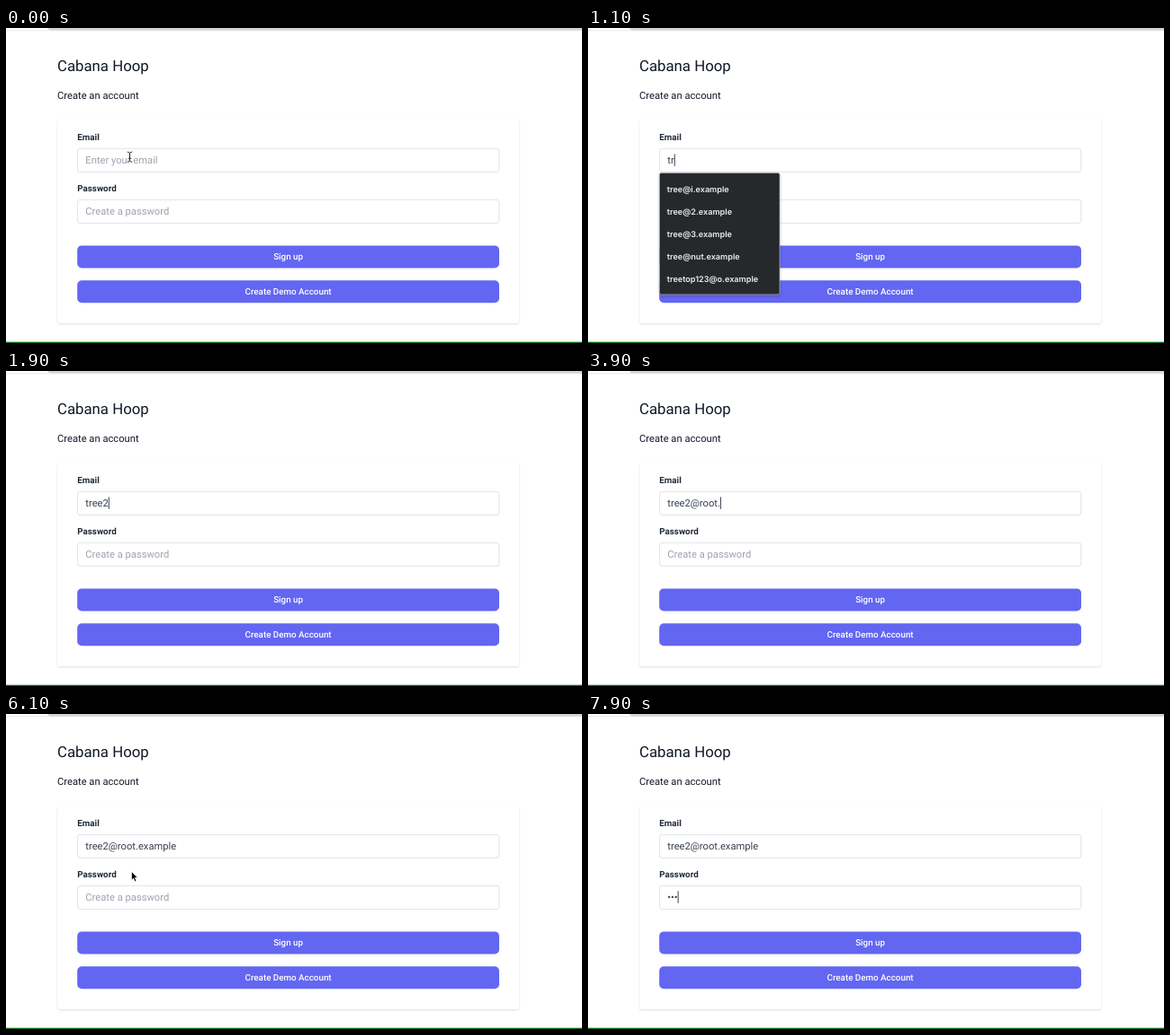
These frames come from a looping animation (640x351 px, 8000 ms). An HTML page:

```html
<!DOCTYPE html>
<html lang="en">
<head>
<meta charset="utf-8">
<title>Create an account</title>
<style>
  html, body { margin: 0; width: 100%; height: 100%; overflow: hidden; background: #fff; }
  svg { display: block; width: 640px; height: 351px; }
  text { font: 11.2px Roboto, sans-serif; fill: #111827; text-rendering: geometricPrecision; white-space: pre; }
  .title { font-size: 16.8px; }
  .label { font-size: 9.8px; font-weight: 700; fill: #1f2937; }
  .hint { fill: #9ca3af; }
  .typed { fill: #374151; }
  .btn { fill: #6366f1; }
  .btn + text { font-size: 9.8px; font-weight: 500; fill: #fff; text-anchor: middle; }
  .card { fill: #fff; filter: drop-shadow(0 1.5px 1.3px #0002); }
  .field { fill: #fff; stroke: #e1e3e7; stroke-width: .8; filter: drop-shadow(0 .8px .6px #0002); }
  .popup rect { fill: #26292b; stroke: #c9cacb; stroke-width: .6; filter: drop-shadow(0 1px 1.5px #0004); }
  .popup text { font: 600 9.1px Inter, sans-serif; fill: #ececec; }
</style>
</head>
<body>
<svg viewBox="0 0 640 351">
  <rect width="640" height="351" fill="#fff"/>
  <path d="M0 2.8H640" stroke="#e6e6e6"/>
  <path d="M46 0H640V2.4H50Q47 2.4 46 0Z" fill="#d4d4d4"/>
  <path d="M0 350.4H640" stroke="#0b6b16" stroke-width="1.2"/>

  <text class="title" x="57" y="48">Cabana Hoop</text>
  <text x="57" y="79.3">Create an account</text>

  <rect class="card" x="57.3" y="102" width="512.7" height="227" rx="3"/>
  <text class="label" x="79.3" y="125">Email</text>
  <rect class="field" x="79.6" y="134.4" width="468.2" height="26" rx="2.8"/>
  <text class="label" x="79.3" y="182">Password</text>
  <rect class="field" x="79.6" y="191.4" width="468.2" height="26" rx="2.8"/>
  <text class="hint" id="mailHint" x="88.3" y="150.9">Enter your email</text>
  <text class="hint" id="passHint" x="88.3" y="207.8">Create a password</text>
  <text class="typed" id="mail" x="88.3" y="150.9"></text>
  <text class="typed" id="pass" x="88.3" y="207.8"></text>
  <rect id="caret" width="1" height="13.4" fill="#374151"/>

  <rect class="btn" x="79.2" y="242.4" width="468.8" height="25" rx="5"/>
  <text x="313.6" y="258.3">Sign up</text>
  <rect class="btn" x="79.2" y="281.2" width="468.8" height="25" rx="5"/>
  <text x="313.6" y="297.2">Create Demo Account</text>

  <g id="popups"></g>
  <g id="beam" fill="none" stroke-linecap="round">
    <path id="beamPath" d="M-2.4 -5.6Q0 -5.6 0 -4V4Q0 5.6 -2.4 5.6M2.4 -5.6Q0 -5.6 0 -4V4Q0 5.6 2.4 5.6M-1.4 1.6H1.4" stroke="#fff" stroke-width="2"/>
    <use href="#beamPath" style="stroke:#222"/>
    <path d="M-2.4 -5.6Q0 -5.6 0 -4V4Q0 5.6 -2.4 5.6M2.4 -5.6Q0 -5.6 0 -4V4Q0 5.6 2.4 5.6M-1.4 1.6H1.4" stroke="#222" stroke-width=".9"/>
  </g>
  <path id="arrow" d="M0 0V9.6L2.2 7.6L3.8 11.2L5.6 10.4L4 6.9H7Z" fill="#000" stroke="#fff" stroke-width=".8"/>
</svg>
<script>
const $ = id => document.getElementById(id);
const LOOP = 8000;
const ADDRESS = "tree2@root.example";

const lists = [
  { width: 142, rows: ["lakepond32@w.example", "tree@i.example", "lakepad@n.example",
      "everything@oak.example", "moonmug@m.example", "lakepad32@n.example"] },
  { width: 133.6, rows: ["tree@i.example", "tree@2.example", "tree@3.example",
      "tree@nut.example", "treetop123@o.example"] }
];

// Each track holds [time, value] steps.
const mailLength = [[0, 0], [900, 1], [1000, 2], [1200, 3], [1300, 4], [1900, 5], [2700, 6],
  [3200, 8], [3400, 9], [3500, 10], [3900, 11], [4000, 12], [4200, 13], [4500, 14],
  [4800, 15], [5200, 16], [5300, 18]];
const passLength = [[0, 0], [7700, 1], [7800, 2], [7900, 3]];
const popup = [[0, -1], [600, 0], [900, 1], [1900, -1]];
const caretOn = [[0, 0], [600, 1], [1500, 0], [1900, 1], [2400, 0], [2700, 1],
  [5800, 0], [6500, 1], [6900, 0], [7400, 1]];
const pointer = [[0, ["beam", 137.5, 143.7]], [200, ["beam", 137, 144.2]], [300, ["beam", 136.6, 144.6]],
  [900, null], [5800, ["beam", 136.8, 147]], [5900, ["beam", 137.4, 154]],
  [6000, ["arrow", 138.2, 166]], [6100, ["arrow", 139.4, 175.6]], [6200, ["arrow", 140, 184]],
  [6300, ["beam", 140, 194.5]], [7700, null]];

const at = (track, t) => track.findLast(step => step[0] <= t)[1];
const show = (el, on) => el.style.display = on ? "" : "none";

function setText(el, value) {
  if (el.textContent !== value) el.textContent = value;
}

function buildPopup({ width, rows }) {
  const texts = rows.map((row, i) => `<text x="87.8" y="${182.8 + 25 * i}">${row}</text>`);
  return `<g class="popup"><rect x="79.4" y="161.4" width="${width}"
    height="${rows.length * 25 + 10.6}" rx="2"/>${texts.join("")}</g>`;
}

$("popups").innerHTML = lists.map(buildPopup).join("");
const popups = [...$("popups").children];

function draw(t) {
  const typed = at(mailLength, t), dots = at(passLength, t);
  setText($("mail"), ADDRESS.slice(0, typed));
  setText($("pass"), "•".repeat(dots));
  show($("mailHint"), !typed);
  show($("passHint"), !dots);

  const inPass = t >= 6400;
  const field = $(inPass ? "pass" : "mail");
  const textWidth = field.textContent ? field.getComputedTextLength() : 0;
  $("caret").setAttribute("x", 88.3 + textWidth);
  $("caret").setAttribute("y", inPass ? 197.3 : 140.4);
  show($("caret"), at(caretOn, t));

  const open = at(popup, t);
  popups.forEach((el, i) => show(el, i === open));

  const [kind, x, y] = at(pointer, t) || [];
  for (const id of ["beam", "arrow"]) {
    show($(id), id === kind);
    if (id === kind) $(id).setAttribute("transform", `translate(${x} ${y})`);
  }
}

const start = performance.now();
function tick() {
  draw((performance.now() - start) % LOOP);
  requestAnimationFrame(tick);
}
tick();
</script>
</body>
</html>
```
